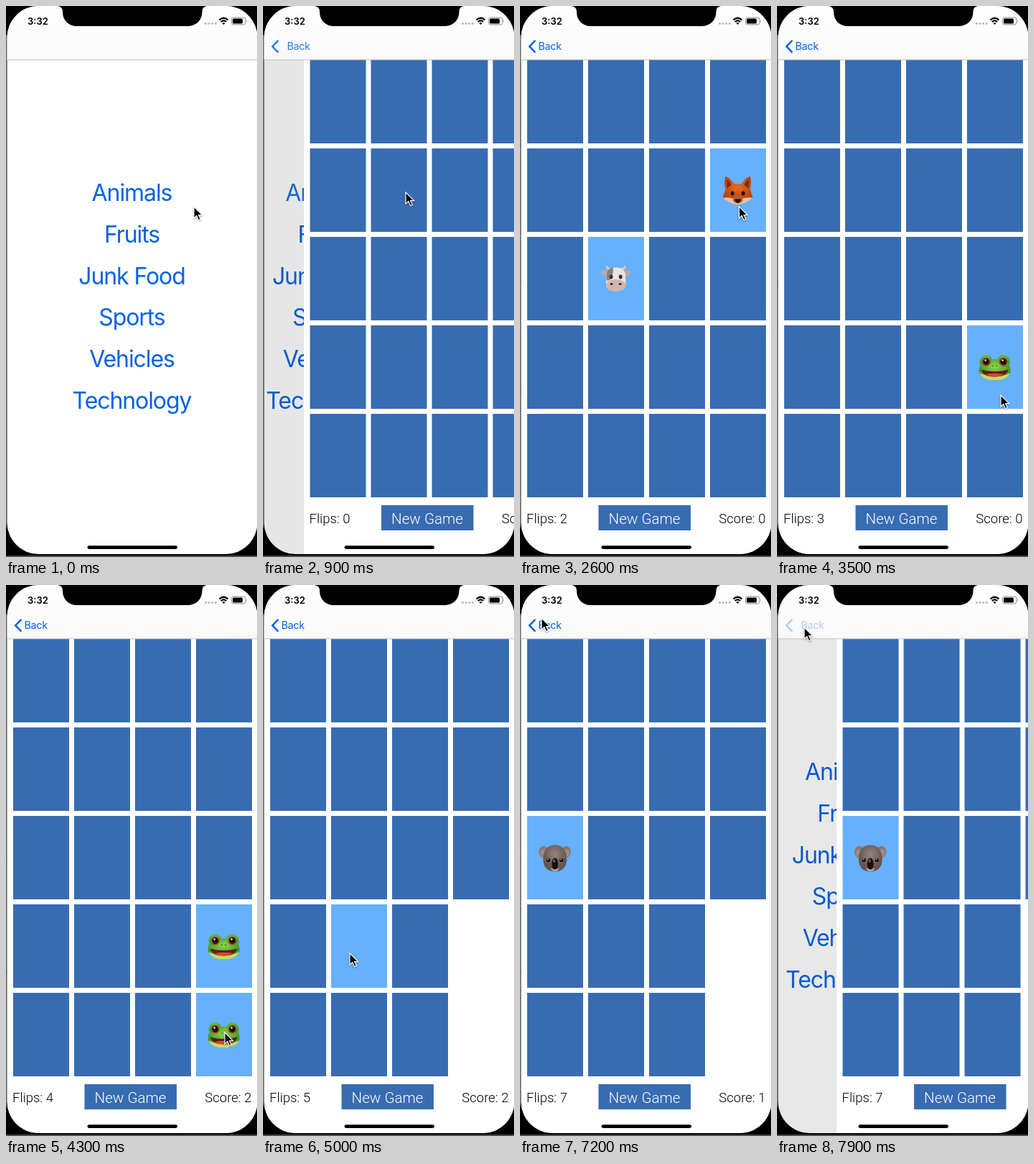
These frames come from a looping animation (350 by 766 pixels, 8 s). An HTML page:

```html
<!DOCTYPE html>
<html lang="en">
<head>
<meta charset="utf-8">
<title>Card matching game</title>
<style>
html, body { margin: 0; width: 100%; height: 100%; overflow: hidden; background: #000; }
svg { display: block; width: 350px; height: 766px; font-optical-sizing: none; }
.menu { font: 32px Inter, "Liberation Sans", sans-serif; letter-spacing: -.034em; fill: #0462e4; text-anchor: middle; }
.label { font: 350 18.5px Roboto, "Liberation Sans", sans-serif; fill: #000; }
.button { font: 300 20.6px Roboto, "Liberation Sans", sans-serif; fill: #fff; text-anchor: middle; }
.back { font: 14.3px Inter, "Liberation Sans", sans-serif; letter-spacing: -.02em; fill: #0462e4; }
.clock { font: 600 13px Inter, sans-serif; }
</style>
</head>
<body>
<svg viewBox="0 0 350 766">
  <defs>
    <clipPath id="screen"><rect x="1.5" y="0" width="349" height="762" rx="44"/></clipPath>
    <linearGradient id="bar" x2="0" y2="1"><stop stop-color="#fff"/><stop offset="1" stop-color="#f9f9f9"/></linearGradient>
    <radialGradient id="green" cy=".35"><stop stop-color="#8fd84a"/><stop offset="1" stop-color="#3f9a2c"/></radialGradient>
    <radialGradient id="orange" cy=".4"><stop stop-color="#ea6c1c"/><stop offset="1" stop-color="#b8440f"/></radialGradient>
    <radialGradient id="yellow" cy=".4"><stop stop-color="#ffdc4e"/><stop offset="1" stop-color="#f3b021"/></radialGradient>
    <radialGradient id="gray" cy=".35"><stop stop-color="#94847d"/><stop offset="1" stop-color="#65564f"/></radialGradient>

    <g id="cow">
      <path d="M-11-12Q-16-17-13-19Q-10-15-6-15M11-12Q16-17 13-19Q10-15 6-15" fill="#d8c9a8"/>
      <path d="M-12-11Q-20-15-21-9Q-18-2-11-4M12-11Q20-15 21-9Q18-2 11-4" fill="#b9aaa4"/>
      <path d="M-13-8Q-11-16 0-16T13-8L14 6Q12 17 0 17T-14 6Z" fill="#e9e4e0"/>
      <path d="M-13-8Q-11-15-4-16Q-3-4-9 2H-13Z" fill="#8f8078"/>
      <ellipse cy="9" rx="14" ry="8.5" fill="#d3b5b0"/>
      <g fill="#352a28"><ellipse cx="-6.5" cy="-3" rx="2.3" ry="3"/><ellipse cx="6.5" cy="-3" rx="2.3" ry="3"/>
      <ellipse cx="-6" cy="7" rx="2" ry="1.5"/><ellipse cx="6" cy="7" rx="2" ry="1.5"/></g>
    </g>

    <g id="frog">
      <circle cx="-12" cy="-8" r="9" fill="url(#green)"/><circle cx="12" cy="-8" r="9" fill="url(#green)"/>
      <path d="M-17-9Q0-14 17-9Q23 0 22 6Q18 18 0 18T-22 6Q-23 0-17-9Z" fill="url(#green)"/>
      <path d="M-21 8Q0 17 21 8Q17 18 0 18T-21 8Z" fill="#c4dd62"/>
      <path d="M-19 3Q0 8 19 3Q16 13 0 13T-19 3Z" fill="#6d1414"/>
      <path d="M-13 9.5Q0 7 13 9.5Q7 13 0 13T-13 9.5Z" fill="#d8453c"/>
      <g fill="#9a5a22"><circle cx="-12" cy="-8" r="6.3"/><circle cx="12" cy="-8" r="6.3"/></g>
      <g fill="#17100c"><circle cx="-12" cy="-8" r="4.4"/><circle cx="12" cy="-8" r="4.4"/></g>
      <g fill="#fff"><circle cx="-13" cy="-10" r="1.2"/><circle cx="11" cy="-10" r="1.2"/></g>
      <g fill="#27631d"><circle cx="-2.5" cy="-2" r=".9"/><circle cx="2.5" cy="-2" r=".9"/></g>
    </g>

    <g id="fox">
      <path d="M-17-20Q-9-16-5-9H5Q9-16 17-20Q20-9 17-2L21 10Q13 18 0 20Q-13 18-21 10L-17-2Q-20-9-17-20Z" fill="url(#orange)"/>
      <path d="M-15-15Q-11-12-9-8L-15-3ZM15-15Q11-12 9-8L15-3Z" fill="#6f2c10"/>
      <path d="M-21 10Q-9 9-4 13H4Q9 9 21 10Q13 18 0 20Q-13 18-21 10Z" fill="#d9c6b8"/>
      <path d="M-4 3H4L7 14Q4 18 0 18T-7 14Z" fill="#c9561a"/>
      <g fill="#1c100b"><ellipse cx="-7.5" cy="4" rx="2.4" ry="3"/><ellipse cx="7.5" cy="4" rx="2.4" ry="3"/>
      <path d="M-4.5 12H4.5Q4 16 0 17.5Q-4 16-4.5 12Z"/></g>
    </g>

    <g id="tiger">
      <g fill="#f3b021"><circle cx="-13" cy="-12" r="6"/><circle cx="13" cy="-12" r="6"/></g>
      <g fill="#6b4a1c"><circle cx="-13" cy="-12" r="2.8"/><circle cx="13" cy="-12" r="2.8"/></g>
      <path d="M0-17Q13-17 16-6L19 8Q13 19 0 19T-19 8L-16-6Q-13-17 0-17Z" fill="url(#yellow)"/>
      <path d="M-18 3Q-12-1-6 4L0 8L6 4Q12-1 18 3L19 8Q13 19 0 19T-19 8Z" fill="#fff8ea"/>
      <path d="M0-17V-9M-5-16L-2-11M5-16L2-11M-10-13L-5-8M10-13L5-8M-17-2L-13 0M17-2L13 0M-18 4L-13 5M18 4L13 5M-17 10L-12 9M17 10L12 9M-13 15L-9 12M13 15L9 12" stroke="#1b140c" stroke-width="2.5" stroke-linecap="round"/>
      <g fill="#1b140c"><ellipse cx="-7" cy="1" rx="2.4" ry="3"/><ellipse cx="7" cy="1" rx="2.4" ry="3"/></g>
      <path d="M-4 7H4L0 11.5Z" fill="#d8606a"/>
      <path d="M0 11V13M-6 13Q-3 16 0 13Q3 16 6 13" fill="none" stroke="#3b2414" stroke-width="1.3"/>
    </g>

    <g id="koala">
      <g fill="#8a7870"><ellipse cx="-15.5" cy="-8.5" rx="6.8" ry="8"/><ellipse cx="15.5" cy="-8.5" rx="6.8" ry="8"/></g>
      <g fill="#a18b82"><ellipse cx="-16.5" cy="-7" rx="3.8" ry="5"/><ellipse cx="16.5" cy="-7" rx="3.8" ry="5"/></g>
      <path d="M0-18Q13-18 16-4Q19 18 0 19Q-19 18-16-4Q-13-18 0-18Z" fill="url(#gray)"/>
      <path d="M-6 14Q0 17 6 14Q5 18.5 0 18.5T-6 14Z" fill="#b7a59c"/>
      <g fill="#16100f"><circle cx="-9" cy="3" r="2.6"/><circle cx="9" cy="3" r="2.6"/><ellipse cy="8" rx="4.4" ry="8"/></g>
      <g fill="#fff"><circle cx="-9.6" cy="2" r=".8"/><circle cx="8.4" cy="2" r=".8"/></g>
      <ellipse cx="-1" cy="4" rx="1.5" ry="2.6" fill="#635a59"/>
    </g>
  </defs>

  <rect width="350" height="766"/>
  <path d="M.5 40V725M0 765H350" stroke="#666" fill="none" stroke-width="1.5"/>
  <g clip-path="url(#screen)">
    <rect width="350" height="766" fill="#fff"/>
    <g id="menu" class="menu"></g>
    <rect id="dim" width="350" height="766"/>
    <g id="page">
      <rect x="1.5" y="75" width="360" height="691" fill="#fff"/>
      <g id="cards"></g>
      <text id="flips" class="label" x="9" y="719"></text>
      <text id="score" class="label" x="342.5" y="719" text-anchor="end"></text>
      <rect x="109.5" y="694" width="128.5" height="35" fill="#386cb2"/>
      <text class="button" x="173.5" y="720">New Game</text>
    </g>
    <rect width="350" height="75" fill="url(#bar)"/>
    <path d="M0 74.8H350" stroke="#bdbdbd" stroke-width=".9"/>
    <g id="back" class="back">
      <path d="M21.3 47.8L13.2 56.2L21.3 64.6" fill="none" stroke="#0462e4" stroke-width="2.5"/>
      <text id="backText" y="61.3">Back</text>
    </g>
    <text class="clock" x="30" y="26">3:32</text>
    <path d="M278.5 24.3H293" stroke="#bbb" stroke-width="3.2" stroke-linecap="round" stroke-dasharray="0 4.6"/>
    <path d="M297.5 19.5Q303.5 14 309.5 19.5M299.8 22Q303.5 18.8 307.2 22" fill="none" stroke="#000" stroke-width="2.2"/>
    <path d="M301.4 23.8Q303.5 22.2 305.6 23.8L303.5 26Z"/>
    <rect x="314.5" y="16" width="19.5" height="10" rx="2.8" fill="none" stroke="#888"/>
    <rect x="316" y="17.5" width="14" height="7" rx="1.5"/>
    <path d="M335.3 19.3Q337 21 335.3 22.8Z" fill="#888"/>
    <path d="M72 0Q79 1 79 8C79 20 87 28 99 28H253C265 28 273.5 20 273.5 8Q273.5 1 280 0Z"/>
    <rect x="113.5" y="750.3" width="125.5" height="4.6" rx="2.3"/>
  </g>
  <path id="cursor" d="M0 0V16L3.8 12.6L6.6 18.8L9.3 17.6L6.6 11.6H11.6Z" stroke="#fff" stroke-width="1.2" style="filter:drop-shadow(0 1px 1px #0006)"/>
</svg>
<script>
const LOOP = 8000, STEP = 100, PUSH = 680, POP = 7839;
const $ = id => document.getElementById(id);

function add(parent, tag, attrs, text = '') {
  const el = document.createElementNS('http://www.w3.org/2000/svg', tag);
  set(el, attrs);
  el.textContent = text;
  return parent.appendChild(el);
}
function set(el, attrs) {
  for (const k in attrs) el.setAttribute(k, attrs[k]);
}

// time, column, row, face
const flips = [
  [1400, 1, 2, 'cow'], [2200, 3, 1, 'fox'], [3200, 3, 3, 'frog'], [4000, 3, 4, 'frog'],
  [5000, 1, 3, 'tiger'], [5800, 0, 3, 'fox'], [6800, 0, 2, 'koala']
];
// time, x, y
const path = [
  [0, 262, 279], [400, 200, 261], [900, 199, 259], [1300, 141, 367], [1600, 141, 367],
  [2150, 305, 255], [2500, 305, 258], [3100, 312, 540], [3500, 312, 541], [3900, 305, 622],
  [4300, 305, 622], [4850, 121, 512], [5350, 121, 512], [5750, 50, 510], [6000, 50, 510],
  [6300, 46, 395], [6850, 46, 390], [7200, 30, 46], [7700, 38, 59], [8000, 38, 59]
];

const items = ['Animals', 'Fruits', 'Junk Food', 'Sports', 'Vehicles', 'Technology']
  .map((name, i) => add($('menu'), 'text', { x: 175.5, y: 271 + 57.8 * i }, name));
const cards = Array.from({ length: 20 }, (_, i) => add($('cards'), 'rect',
  { x: 10 + 85 * (i % 4), y: 75 + 123 * Math.floor(i / 4), width: 78, height: 116 }));
const faces = flips.map(([, col, row, face]) => add($('cards'), 'use',
  { href: '#' + face, x: 48.7 + 85 * col, y: 133.5 + 123 * row }));

const clamp = v => Math.min(1, Math.max(0, v));
const ease = v => v * v * (3 - 2 * v);
// Share of a critically damped slide still to go
function rest(ms) {
  const x = Math.max(0, ms) * 0.015;
  return (1 + x) * Math.exp(-x);
}

function pointer(t) {
  const i = path.findIndex(p => p[0] > t);
  const [t0, x0, y0] = path[i - 1], [t1, x1, y1] = path[i];
  const k = ease((t - t0) / (t1 - t0));
  return `translate(${x0 + (x1 - x0) * k} ${y0 + (y1 - y0) * k})`;
}

function draw(t) {
  const popping = t >= POP;
  const away = popping ? 1 - rest(t - POP) : rest(t - PUSH);
  set($('page'), { transform: `translate(${350 * away} 0)` });
  set($('menu'), { transform: `translate(${-105 * (1 - away)} 0)` });
  set($('dim'), { opacity: 0.105 * Math.sqrt(1 - away) });
  set(items[0], { opacity: t < 500 ? 1 : t < 700 ? 0.3 : clamp(0.5 + (t - 700) / 500) });

  set($('back'), { opacity: t >= 7700 ? 0.3 : 1 - away });
  set($('backText'), { x: 25.5 + (popping ? 34 : 50) * away });

  const n = flips.filter(f => t >= f[0]).length;
  cards.forEach(c => set(c, { fill: '#386cb2' }));
  flips.forEach(([start, col, row], i) => {
    const up = i < n && i >= n - (n % 2 ? 1 : 2);
    const gone = n > 4 && (i === 2 || i === 3);
    set(cards[row * 4 + col], { fill: gone ? '#fff' : up ? '#67b0fb' : '#386cb2' });
    set(faces[i], { opacity: up ? clamp((t - start) / 300) : 0 });
  });
  $('flips').textContent = 'Flips: ' + n;
  $('score').textContent = 'Score: ' + (n < 4 ? 0 : n < 6 ? 2 : 1);
  set($('cursor'), { transform: pointer(t) });
}

const begin = performance.now();
function tick() {
  const t = (performance.now() - begin) % LOOP;
  draw(Math.floor(t / STEP) * STEP);
  requestAnimationFrame(tick);
}
tick();
</script>
</body>
</html>
```
